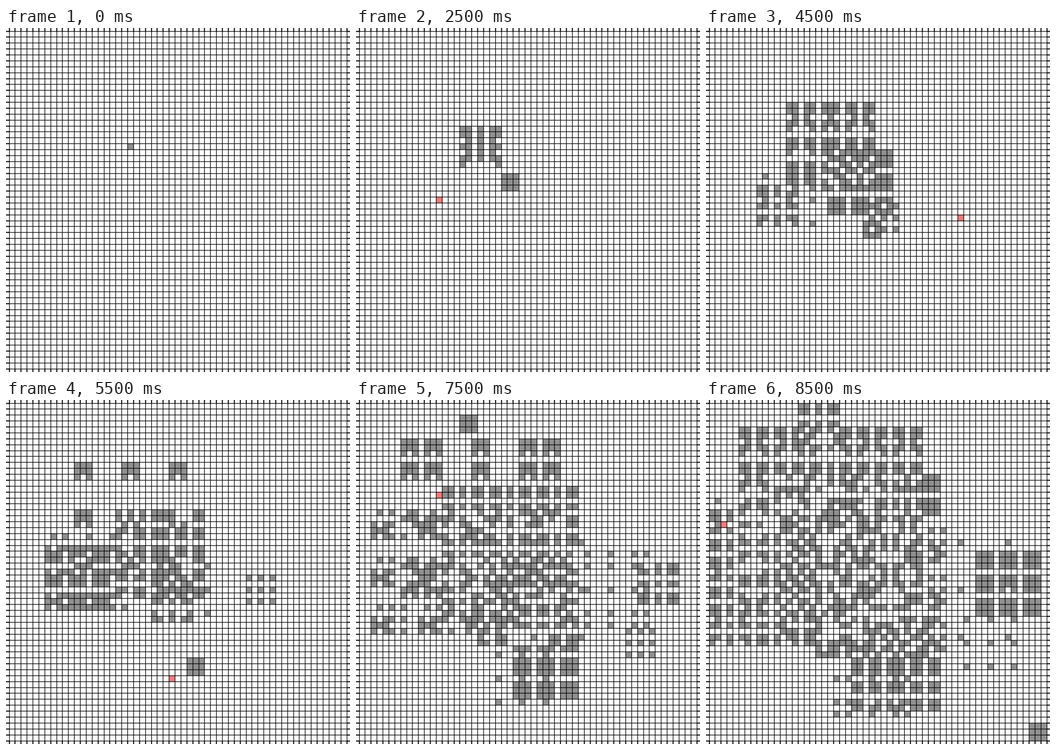
An HTML page with a canvas for the animation above (10 s loop, 748 by 748 pixels).

```html
<!DOCTYPE html>
<html lang="en">
<head>
<meta charset="utf-8">
<title>Parity automaton</title>
<style>
  html, body { margin: 0; width: 100%; height: 100%; overflow: hidden; background: #fff; }
  canvas { display: block; }
</style>
</head>
<body>
<canvas id="stage" width="748" height="748"></canvas>
<script>
const SIZE = 748, N = 57, MARGIN = 7, LOOP = 10000;
const GRAY = '#909090', RED = '#ff7878';
const SEED = [20, 19];
// One cell is toggled after each step: [column, row].
const TOGGLES = [
  [20, 20], [25, 25], [13, 28], [11, 29], [29, 31],
  [27, 33], [42, 31], [31, 44], [27, 46], [50, 30],
  [47, 40], [18, 3], [13, 15], [55, 55], [2, 20]
];

const ctx = document.getElementById('stage').getContext('2d');
const edge = k => Math.floor(MARGIN + k * (SIZE - 2 * MARGIN) / N);
const emptyGrid = () => Array.from({ length: N }, () => new Uint8Array(N));

// A cell lives on when its 3x3 block holds an odd number of live cells.
function evolve(grid) {
  const next = emptyGrid();
  for (let y = 0; y < N; y++) {
    for (let x = 0; x < N; x++) {
      for (let dy = -1; dy <= 1; dy++) {
        for (let dx = -1; dx <= 1; dx++) {
          const row = grid[y + dy];
          if (row && row[x + dx]) next[y][x] ^= 1;
        }
      }
    }
  }
  return next;
}

function buildStates() {
  const first = emptyGrid();
  first[SEED[1]][SEED[0]] = 1;
  const states = [first];
  for (const [x, y] of TOGGLES) {
    const grid = evolve(states[states.length - 1]);
    grid[y][x] ^= 1;
    states.push(grid);
  }
  return states;
}

function fillCell(x, y, color) {
  const left = edge(x), top = edge(y);
  ctx.fillStyle = color;
  ctx.fillRect(left, top, edge(x + 1) - left, edge(y + 1) - top);
}

function drawLines() {
  const far = SIZE - MARGIN;
  ctx.fillStyle = '#000';
  for (let k = 0; k <= N; k++) {
    const p = edge(k) - 0.2;
    ctx.fillRect(p, 0, 1.4, SIZE);
    ctx.fillRect(0, p, SIZE, 1.4);
    // Heavier ticks in the margins
    const t = edge(k) - 0.5;
    for (const m of [0, far]) {
      ctx.fillRect(t, m, 2, MARGIN);
      ctx.fillRect(m, t, MARGIN, 2);
    }
  }
}

function draw(step) {
  ctx.fillStyle = '#fff';
  ctx.fillRect(0, 0, SIZE, SIZE);
  states[step].forEach((row, y) => row.forEach((live, x) => {
    if (live) fillCell(x, y, GRAY);
  }));
  if (step > 0) fillCell(...TOGGLES[step - 1], RED);
  drawLines();
}

const states = buildStates();
const start = performance.now();
let shown = -1;

function tick() {
  const t = (performance.now() - start) % LOOP;
  const step = Math.min(TOGGLES.length, Math.max(0, Math.floor((t - 1000) / 500)));
  if (step !== shown) draw(shown = step);
  requestAnimationFrame(tick);
}
tick();
</script>
</body>
</html>
```
